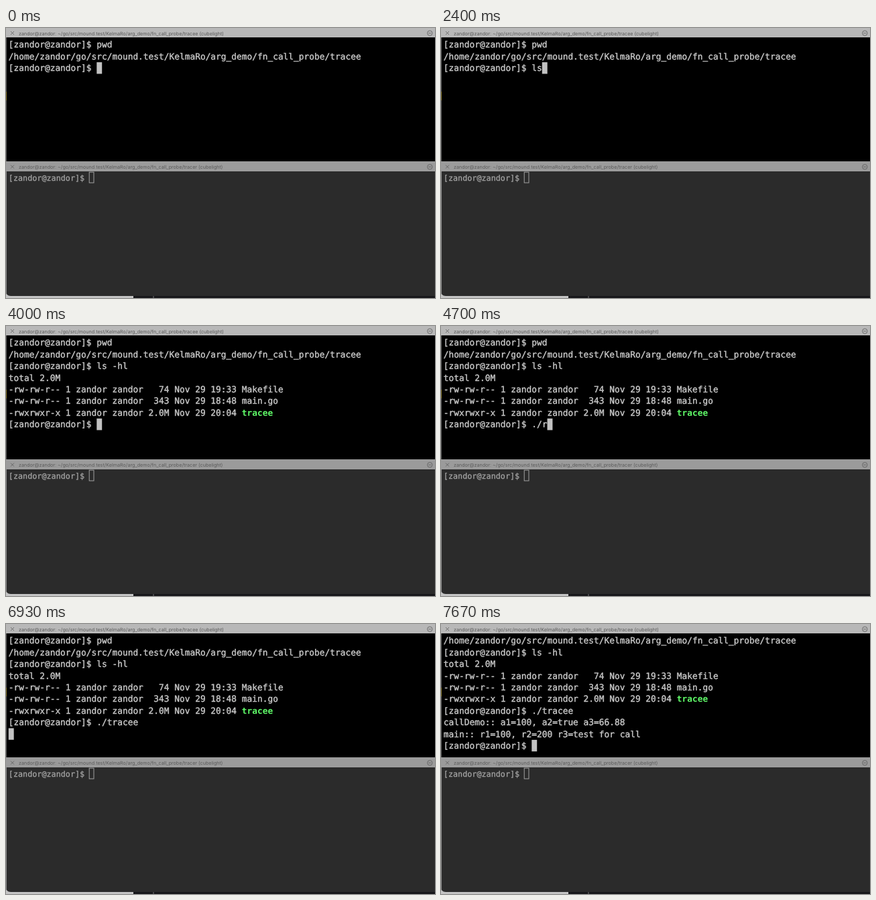
Recreate the animation shown at these times as an HTML page. Size 640x403 px, loop 8 s.

```html
<!DOCTYPE html>
<html lang="en">
<head>
<meta charset="utf-8">
<title>Terminal</title>
<style>
  html, body { margin: 0; width: 640px; height: 403px; overflow: hidden; background: #000; }
  svg { display: block; }
  text { white-space: pre; text-rendering: geometricPrecision; }
  .mono { font-family: "DejaVu Sans Mono", monospace; font-size: 12.85px; fill: #c7c7c7; stroke: #c7c7c7; stroke-width: .4; }
  .dim { font-size: 11.77px; fill: #a2a2a2; stroke: #a2a2a2; stroke-width: .3; }
  .title { font-family: Inter, sans-serif; font-size: 7.17px; fill: #5a5a5a; }
  .icon { fill: none; stroke: #5a5a5a; stroke-width: .8; }
  .exec { fill: #5ffa68; stroke: none; font-weight: bold; }
</style>
</head>
<body>
<svg width="640" height="403" viewBox="0 0 640 403">
  <defs>
    <g id="bar">
      <path class="icon" d="M7 5l5 5m0-5l-5 5"/>
      <circle class="icon" cx="632.3" cy="7.7" r="3.7"/>
      <path class="icon" d="M630.3 7.7h4"/>
    </g>
  </defs>

  <rect width="640" height="403" fill="#17171a"/>
  <rect y="390" width="190" height="13" fill="#c4c4c4"/>
  <rect x="219.5" y="400" width="1" height="3" fill="#777"/>

  <rect width="640" height="200" fill="#000"/>
  <rect width="640" height="14" fill="#b8b8b8"/>
  <use href="#bar"/>
  <text class="title" x="19" y="10.5">zandor@zandor: ~/go/src/mound.test/KelmaRo/arg_demo/fn_call_probe/tracee (cubelight)</text>

  <path d="M0 199H640V400H7Q0 400 0 393Z" fill="#2b2b2b"/>
  <rect y="199" width="640" height="15" fill="#9b9b9b"/>
  <use href="#bar" y="199.6"/>
  <text class="title" x="19" y="210.1">zandor@zandor: ~/go/src/mound.test/KelmaRo/arg_demo/fn_call_probe/tracer (cubelight)</text>
  <text class="mono dim" x="3.8" y="228">[zandor@zandor]$ </text>
  <rect x="124.2" y="215.2" width="6.8" height="15.8" fill="none" stroke="#a2a2a2"/>

  <rect y="14" width="1" height="185" fill="#555"/>
  <rect y="95" width="1" height="13" fill="#8a7a30"/>
  <rect y="214" width="1" height="182" fill="#8c8c8c"/>

  <g id="rows" class="mono"></g>
  <rect id="cursor" width="7.9" height="17.3" fill="#c2c2c2"/>
  <rect id="scroller" x="635.5" y="183.5" width="3.8" height="14" rx="1.9" fill="#8a8a8a"/>
</svg>

<script>
const LOOP = 8000, ROWS = 10, PITCH = 17.4, ADVANCE = 7.736, LEFT = 3.8, TOP = 16.3;
const prompt = '[zandor@zandor]$ ';
const intro = [prompt + 'pwd', '/home/zandor/go/src/mound.test/KelmaRo/arg_demo/fn_call_probe/tracee'];
const listing = [
  'total 2.0M',
  '-rw-rw-r-- 1 zandor zandor   74 Nov 29 19:33 Makefile',
  '-rw-rw-r-- 1 zandor zandor  343 Nov 29 18:48 main.go',
  '-rwxrwxr-x 1 zandor zandor 2.0M Nov 29 20:04 <tspan class="exec">tracee</tspan>'
];
const output = ['callDemo:: a1=100, a2=true a3=66.88', 'main:: r1=100, r2=200 r3=test for call'];

// [time, command line contents]
const firstCommand = [
  [0, ''], [870, '.'], [1070, './'], [1770, '.'], [1900, ''],
  [2270, 'l'], [2370, 'ls'], [2450, 'ls '], [2550, 'ls -'], [2640, 'ls -h'], [2730, 'ls -hl']
];
const secondCommand = [
  [0, ''], [4100, '.'], [4230, './'], [4700, './r'], [5130, './'], [5330, './t'],
  [5530, './tr'], [5670, './tra'], [6000, './trac'], [6100, './trace'], [6170, './tracee']
];
const typed = (keys, t) => prompt + keys.filter(([at]) => at <= t).pop()[1];

function screenLines(t) {
  const lines = [...intro, typed(firstCommand, t)];
  if (t >= 3130) lines.push(...(t < 3170 ? [''] : [...listing, typed(secondCommand, t)]));
  if (t >= 6930) lines.push(...(t < 6970 ? [''] : [...output, prompt]));
  return lines.slice(-ROWS);
}

const [rows, cursor, scroller] = ['rows', 'cursor', 'scroller'].map(id => document.getElementById(id));
let shown = '';

function draw() {
  const t = performance.now() % LOOP;
  const lines = screenLines(t);
  const markup = lines.map((line, i) =>
    `<text x="${LEFT}" y="${TOP + 13 + i * PITCH}">${line}</text>`).join('');
  if (markup !== shown) rows.innerHTML = shown = markup;

  const last = lines.length - 1;
  cursor.setAttribute('x', LEFT + lines[last].length * ADVANCE);
  cursor.setAttribute('y', TOP + last * PITCH);

  const fade = Math.min(1, Math.max(0, (7670 - t) / 230));
  scroller.setAttribute('opacity', t < 6970 ? 0 : fade);
  requestAnimationFrame(draw);
}
draw();
</script>
</body>
</html>
```
